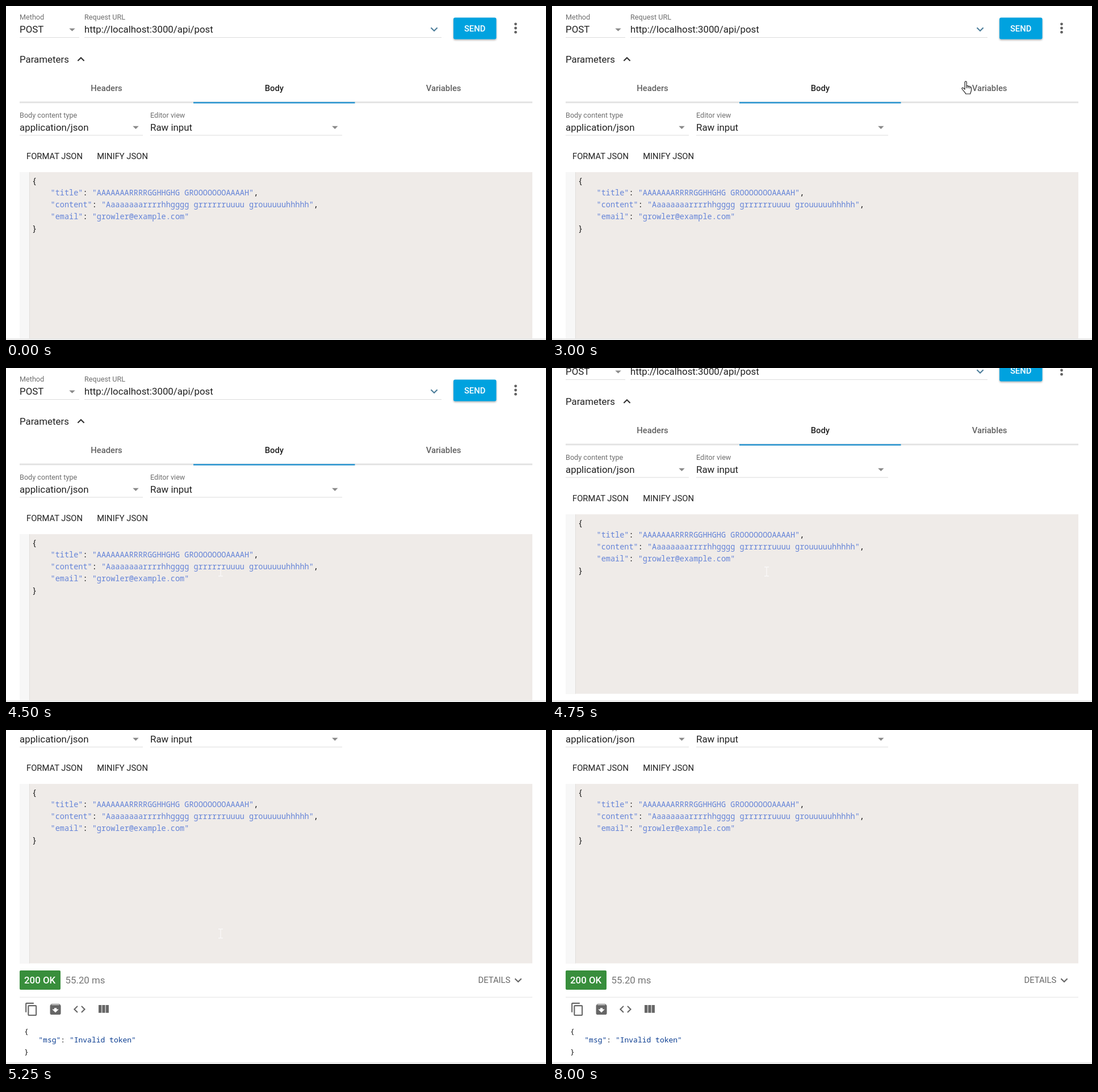
These frames come from a looping animation (951 px wide and 589 px high, 8750 ms). An HTML page:

```html
<!DOCTYPE html>
<html lang="en">
<head>
<meta charset="utf-8">
<title>API request</title>
<style>
  html, body { margin: 0; width: 100%; height: 100%; overflow: hidden; background: #fff; }
  svg { display: block; width: 951px; height: 589px; }
  text { font-family: Roboto, sans-serif; white-space: pre; }
  .label { font-size: 12.66px; fill: #6f6f6f; }
  .value { font-size: 16.88px; fill: #212121; }
  .button { font-size: 14.77px; fill: #212121; }
  .tab { font-size: 14.77px; font-weight: 500; fill: #616161; text-anchor: middle; }
  .code, .reply { font-family: "Noto Sans Mono", monospace; fill: #111; }
  .code { font-size: 13.55px; }
  .code tspan { fill: #6584d8; }
  .reply { font-size: 13px; }
  .reply tspan { fill: #0b3d91; }
  .chevron { fill: none; stroke-width: 2.1; }
</style>
</head>
<body>
<svg viewBox="0 0 951 589">
  <defs>
    <filter id="shadow" x="-20%" y="-30%" width="140%" height="170%">
      <feDropShadow id="drop" dx="0" dy="1.6" stdDeviation="1.4" flood-opacity=".35"/>
    </filter>
  </defs>
  <g id="page"></g>
  <rect y="586.5" width="951" height="2.5" fill="#fff"/>
  <rect y="586.5" width="951" height="1.6" fill="#e1e1e1"/>
  <path id="beam" d="M-4 -8H-1L0 -7L1 -8H4M0 -7V7M-4 8H-1L0 7L1 8H4" fill="none" stroke="#f9f8f7" stroke-width="1.3"/>
  <path id="hand" d="M6 15V2.6C6 .4 9.2.4 9.2 2.6V9C10 8.2 11.6 8.5 12 9.7C13 8.9 14.6 9.4 14.9 10.7C16 10.1 17.5 10.9 17.5 12.4V16C17.5 19 16 20 15.7 23H7.7C6.7 20 3 17.4 1 14C.3 12.4 2 11.4 3.5 12.6ZM9.2 9V13M12 9.7V13M14.9 10.7V13.5"
    fill="#fff" stroke="#222" stroke-width="1.2" stroke-linejoin="round"/>
</svg>
<script>
const $ = id => document.getElementById(id);
const LOOP = 8750, TICK = 250;

const text = (cls, x, y, s, extra = "") => `<text class="${cls}" x="${x}" y="${y}" ${extra}>${s}</text>`;
const rect = (x, y, w, h, fill, extra = "") =>
  `<rect x="${x}" y="${y}" width="${w}" height="${h}" fill="${fill}" ${extra}/>`;
const caret = (x, y) => `<path d="M${x - 5.2} ${y - 2.6}h10.4l-5.2 5.2z" fill="#8a8a8a"/>`;
const chevron = (x, y, dir, color) =>
  `<path class="chevron" stroke="${color}" d="M${x - 5.6} ${y - 2.8 * dir}l5.6 ${5.6 * dir}l5.6 ${-5.6 * dir}"/>`;
const icon = (x, d) => `<path transform="translate(${x} 677.8) scale(1.055)" fill="#666" d="${d}"/>`;
const field = (x, y, w, label, value) =>
  text("label", x, y, label) + text("value", x, y + 23.2, value) + rect(x, y + 31, w, 1, "#dcdcdc");
const str = s => `<tspan>"${s}"</tspan>`;

function buildPage() {
  const body = [
    "{",
    `    ${str("title")}: ${str("AAAAAAARRRRGGHHGHG GROOOOOOOAAAAH")},`,
    `    ${str("content")}: ${str("Aaaaaaaarrrrhhgggg grrrrrruuuu grouuuuuhhhhh")},`,
    `    ${str("email")}: ${str("growler@example.com")}`,
    "}"
  ];
  return [
    field(24, 24, 105, "Method", "POST"), caret(116.5, 42),
    field(138, 24, 629, "Request URL", "http://localhost:3000/api/post"),
    chevron(754, 41, 1, "#4f7f9c"),
    rect(788, 20.5, 75.5, 38, "#00a2df", 'rx="3" filter="url(#shadow)"'),
    text("tab", 825.6, 45.3, "SEND", 'style="fill:#fff"'),
    ...[31.8, 39, 46.2].map(y => `<circle cx="897.5" cy="${y}" r="2.4" fill="#616161"/>`),
    text("value", 24, 100, "Parameters"), chevron(132, 94, -1, "#333"),
    text("tab", 177, 150.2, "Headers"),
    text("tab", 472.4, 150.2, "Body", 'style="fill:#212121"'),
    text("tab", 770.6, 150.2, "Variables"),
    rect(24, 168.5, 903, 2.8, "#e2e2e2"), rect(330, 169.3, 284.5, 2.4, "#1f90cf"),
    field(24, 196.5, 217, "Body content type", "application/json"), caret(228.5, 214.3),
    field(254, 196.5, 338, "Editor view", "Raw input"), caret(579.3, 214.3),
    text("button", 36, 270.4, "FORMAT JSON"), text("button", 160.2, 270.4, "MINIFY JSON"),
    rect(24, 293, 903, 316.5, "#efebe8"), rect(24, 293, 17, 316.5, "#f7f7f7"),
    rect(41, 293, 1, 316.5, "#e0dedc"),
    ...body.map((line, i) => text("code", 46, 313 + 21.1 * i, line)),
    rect(24, 622, 72, 34, "#388e3c", 'rx="2"'),
    text("value", 32, 645, "200 OK", 'style="fill:#fff;font-weight:500"'),
    text("value", 104.5, 645, "55.20 ms", 'style="fill:#757575"'),
    text("button", 831.5, 644.3, "DETAILS", 'style="fill:#666"'), chevron(902, 639.3, 1, "#666"),
    rect(24, 668.7, 903, 1, "#e3e3e3"),
    icon(32, "M16 1H4c-1.1 0-2 .9-2 2v14h2V3h12V1zm3 4H8c-1.1 0-2 .9-2 2v14c0 1.1.9 2 2 2h11c1.1 0 2-.9 2-2V7c0-1.1-.9-2-2-2zm0 16H8V7h11v14z"),
    icon(74.4, "M20.5 5.2l-1.4-1.7C18.9 3.2 18.5 3 18 3H6c-.5 0-.9.2-1.2.6L3.5 5.2C3.2 5.6 3 6 3 6.5V19c0 1.1.9 2 2 2h14c1.1 0 2-.9 2-2V6.5c0-.5-.2-.9-.5-1.3zM12 17.5L6.5 12H10v-2h4v2h3.5L12 17.5zM5.1 5l.8-1h12l1 1H5.1z"),
    icon(116.8, "M9.4 16.6L4.8 12l4.6-4.6L8 6l-6 6 6 6 1.4-1.4zm5.2 0l4.6-4.6-4.6-4.6L16 6l6 6-6 6-1.4-1.4z"),
    icon(158.8, "M10 18h5V5h-5v13zm-6 0h5V5H4v13zM16 5v13h5V5h-5z"),
    text("reply", 32, 733.5, "{"),
    text("reply", 57.3, 749, `${str("msg")}: ${str("Invalid token")}`),
    text("reply", 32, 769.8, "}")
  ].join("");
}

// Pointer stops: time, x, y
const stops = [
  [250, 748, 411], [750, 440, 250], [1000, 277, 180], [1250, 355, 80], [1500, 320, 54],
  [2000, 230, 250], [2500, 210, 362], [2750, 440, 280], [3000, 728, 133], [3250, 828, 42],
  [3750, 828, 42], [4000, 690, 150], [4500, 378, 359], [5500, 378, 359], [7500, 229, 561.5]
];

function pointerAt(t) {
  const i = stops.findIndex(s => s[0] >= t);
  if (i < 0) return stops[stops.length - 1].slice(1);
  if (!i) return stops[0].slice(1);
  const [t0, x0, y0] = stops[i - 1], [t1, x1, y1] = stops[i];
  const k = (t - t0) / (t1 - t0);
  return [x0 + (x1 - x0) * k, y0 + (y1 - y0) * k];
}

const scrollAt = t => t < 4750 ? 0 : t < 5000 ? 35 : t < 5250 ? 181 : 198;

function render(time) {
  const t = Math.floor(time % LOOP / TICK) * TICK;
  const [x, y] = pointerAt(t);
  const shown = t >= 250 && t < 8000;
  const hand = t >= 3000 && t < 4000;
  const pressed = t >= 3250 && t < 4000;
  $("page").setAttribute("transform", `translate(0 ${-scrollAt(t)})`);
  $("drop").setAttribute("stdDeviation", pressed ? 2.6 : 1.4);
  $("beam").setAttribute("visibility", shown && !hand ? "visible" : "hidden");
  $("hand").setAttribute("visibility", hand ? "visible" : "hidden");
  $("beam").setAttribute("transform", `translate(${x} ${y})`);
  $("hand").setAttribute("transform", `translate(${x - 7} ${y - 1})`);
}

function loop() {
  render(performance.now());
  requestAnimationFrame(loop);
}

$("page").innerHTML = buildPage();
loop();
</script>
</body>
</html>
```
